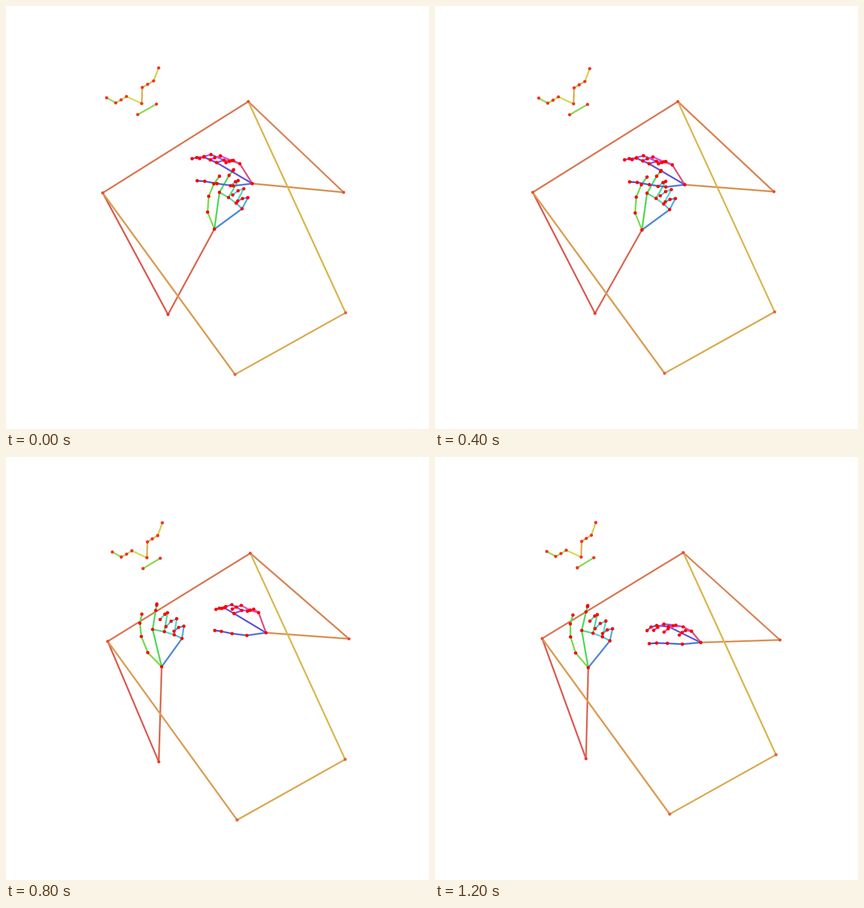
An HTML page with a canvas for the animation above (1.28 s loop, 748x748 px).

```html
<!DOCTYPE html>
<html lang="en">
<head>
<meta charset="utf-8">
<title>Pose skeleton</title>
<style>
  html, body { margin: 0; width: 100%; height: 100%; overflow: hidden; background: #fff; }
  canvas { display: block; }
</style>
</head>
<body>
<canvas id="stage" width="748" height="748"></canvas>
<script>
const ctx = document.getElementById('stage').getContext('2d');
const LOOP = 1280, STEP = 80, END = 1200;
const times = [0, 240, 400, 560, 720, 960, END];

const add = (a, b) => [a[0] + b[0], a[1] + b[1]];
const scale = (a, b) => [a[0] * b[0], a[1] * b[1]];
const mix = (a, b, k) => [a[0] + (b[0] - a[0]) * k, a[1] + (b[1] - a[1]) * k];

// Smoothstep between two moments
function ease(t, from, to) {
  const u = Math.min(1, Math.max(0, (t - from) / (to - from)));
  return u * u * (3 - 2 * u);
}

// Smooth curve through one value per key time
function curve(...v) {
  const last = times.length - 1;
  const slope = k => {
    const a = Math.max(k - 1, 0), b = Math.min(k + 1, last);
    return (v[b] - v[a]) / (times[b] - times[a]);
  };
  return t => {
    let i = 0;
    while (i < last - 1 && t >= times[i + 1]) i++;
    const span = times[i + 1] - times[i], u = (t - times[i]) / span;
    const d = v[i + 1] - v[i], m = slope(i) * span, n = slope(i + 1) * span;
    return v[i] + u * (m + u * (3 * d - 2 * m - n + u * (m + n - 2 * d)));
  };
}

// Shared motions: progress from start to end, and temporary offsets
const drift = curve(0, 0.03, 0.1, 0.24, 0.33, 0.81, 1);
const arm = curve(0, -0.04, 0.18, 0.48, 0.67, 0.85, 1);
const headTurn = curve(0, 0.22, 0.27, 0.43, 0.38, 0.8, 1);
const lift = curve(0, 0.08, 0.03, 0.68, 1, 0.17, 0);
const nod = curve(0, -1, -0.15, 0.2, 1, 0, 0);
const bounce = curve(0, -0.38, 0.32, 0.6, 0, -1, 0);
const swing = t => ease(t, 350, 865);

const joint = (from, to, progress, offset = [0, 0], sway = lift) => t =>
  add(mix(from, to, progress(t)), scale(offset, [sway(t), sway(t)]));

const shoulderR = joint([171, 330.5], [189.5, 321], drift);
const shoulderL = joint([428.5, 169], [439, 169], drift, [-2, 1.5]);
const hipR = joint([405, 651.5], [415, 631.5], drift, [-1.5, 0]);
const hipL = joint([600.5, 542.5], [603, 526.5], drift, [-2.5, 0]);
const elbowR = joint([286.5, 545.5], [267, 533.5], arm, [-2.5, 3]);
const elbowL = joint([597, 329.5], [610, 323.5], arm, [0, -4.5]);
const wristR = joint([368.5, 394.5], [271, 372.5], swing, [0, 6.5], bounce);
const wristL = joint([435.5, 314], [470, 328], arm, [-1.5, -17.4]);
const nose = joint([240, 172.5], [258.5, 177], headTurn, [0, 4.4], nod);

// Offsets from the nose: one eye to ear, other eye to ear, mouth
const face = [
  [1, -28.5], [10.5, -34], [21, -40], [30, -63],
  [-27, -12.5], [-36.5, -6.5], [-46, -1.2], [-62, -10.3],
  [-7, 19.5], [26, 1]
];
const faceHues = [42, 46, 50, 55, 62, 70, 78, 88];

// A pose, seen from the wrist: four thumb joints, index and little knuckle,
// then vectors for the first finger bone, the index end and the finger curl
const handR = {
  poses: [
    [[-12, -30], [-10, -58], [-1, -80], [9, -93.5], [9, -65], [49, -36], [17, -30], [8, -10], [-19.5, 11]],
    [[-24.5, -25], [-36, -53.5], [-38.5, -77], [-35, -93], [-16, -66], [36, -50], [5.5, -33.5], [2, -11.5], [-19, 14]]
  ],
  phase: t => ease(t, 535, 720) - 0.18 * ease(t, 960, END),
  knuckle: [[0.4, -2.4], [0.735, -2.2]],
  bone: [[1, 1], [1, 1], [0.8, 0.85], [0.6, 0.65]],
  curl: [[0, 0], [6, -2], [0, 0], [1.5, -5]],
  bend: [[0.85, 0.82], [0.35, 0.22], [0.52, 0.32], [0.53, 0.25]]
};
const handL = {
  poses: [
    [[-33.5, 4], [-62.5, 0], [-84, -4], [-97.5, -5], [-63, -37], [-22, -35], [-23, -10], [-20.5, 3], [-18, 7]],
    [[-34, 5], [-60, 1.5], [-79, -3], [-90.5, -5], [-56.5, -35], [-12.5, -38], [-17, -11.5], [-14, 2], [-16, 6]],
    [[-32.5, 3], [-59, 1.5], [-78, 1], [-91, 2], [-57, -28], [-16.5, -20], [-21, -2], [-17, 9], [-16, 11]]
  ],
  phase: t => ease(t, 540, 720) + ease(t, 680, END),
  knuckle: [[0.315, -5], [0.64, -4.8]],
  bone: [[1, 1], [1, 1], [0.85, 0.85], [0.5, 0.6]],
  curl: [[0, 0], [-2, 0], [0, 0], [5, -3]],
  bend: [[0.59, 0.3], [0.6, 0.5], [0.55, 0.46], [0.55, 0.45]]
};

// All 21 joints: wrist, then four per finger
function buildHand(hand, wrist, t) {
  const phase = hand.phase(t);
  const i = Math.min(Math.floor(phase), hand.poses.length - 2);
  const pose = hand.poses[i].map((p, k) => mix(p, hand.poses[i + 1][k], phase - i));
  const [index, little, bone, end, curl] = pose.slice(4);
  const [middle, ring] = hand.knuckle.map(([k, rise]) => add(mix(index, little, k), [0, rise]));
  const joints = [[0, 0], ...pose.slice(0, 4)];
  [index, middle, ring, little].forEach((knuckle, f) => {
    const mid = add(knuckle, scale(bone, hand.bone[f]));
    const reach = f ? add(curl, hand.curl[f]) : end;
    joints.push(knuckle, mid, add(mid, scale(reach, hand.bend[f])), add(mid, reach));
  });
  return joints.map(p => add(p, wrist));
}

function line(a, b, hue) {
  ctx.strokeStyle = `hsl(${hue}, 65%, 59%)`;
  ctx.beginPath();
  ctx.moveTo(...a);
  ctx.lineTo(...b);
  ctx.stroke();
}

function drawHand(joints, hue) {
  for (let i = 1; i <= 20; i++) {
    const parent = i % 4 !== 1 ? i - 1 : i > 5 ? i - 4 : 0;
    line(joints[parent], joints[i], hue + 5.9 * (i - 1));
  }
  line(joints[0], joints[17], hue + 5.9 * 20);
}

function dots(points, color, r) {
  ctx.fillStyle = color;
  for (const [x, y] of points) {
    ctx.beginPath();
    ctx.arc(x, y, r, 0, 7);
    ctx.fill();
  }
}

function draw(t) {
  const [shR, shL, elR, elL, wrR, wrL, hpR, hpL, center] =
    [shoulderR, shoulderL, elbowR, elbowL, wristR, wristL, hipR, hipL, nose].map(at => at(t));
  const right = buildHand(handR, wrR, t), left = buildHand(handL, wrL, t);
  const turn = t / END;
  const head = face.map(([x, y]) =>
    add(center, [x * (1 - (x > 0 ? 0.14 : 0.02) * turn), y * (1 - 0.03 * turn)]));

  ctx.fillStyle = '#fff';
  ctx.fillRect(0, 0, 748, 748);
  ctx.lineWidth = 3;

  const limbs = [[shR, elR], [elR, wrR], [shR, shL], [shL, elL], [elL, wrL], [shR, hpR], [hpR, hpL], [shL, hpL]];
  limbs.forEach(([a, b], i) => line(a, b, 4 + 5.8 * i));
  faceHues.forEach((hue, i) => line(i % 4 ? head[i - 1] : center, head[i], hue));
  line(head[8], head[9], 97);
  drawHand(right, 98);
  drawHand(left, 223);

  dots([hpR, hpL], '#e86042', 2.7);
  dots([shR, shL, elL], '#ec4c38', 2.7);
  dots([elR], '#f0382c', 2.7);
  dots([center, ...head], '#f43424', 2.8);
  dots([...right, ...left], '#f00', 2.9);
}

function tick() {
  const t = performance.now() % LOOP;
  draw(Math.floor(t / STEP) * STEP);
  requestAnimationFrame(tick);
}
tick();
</script>
</body>
</html>
```
